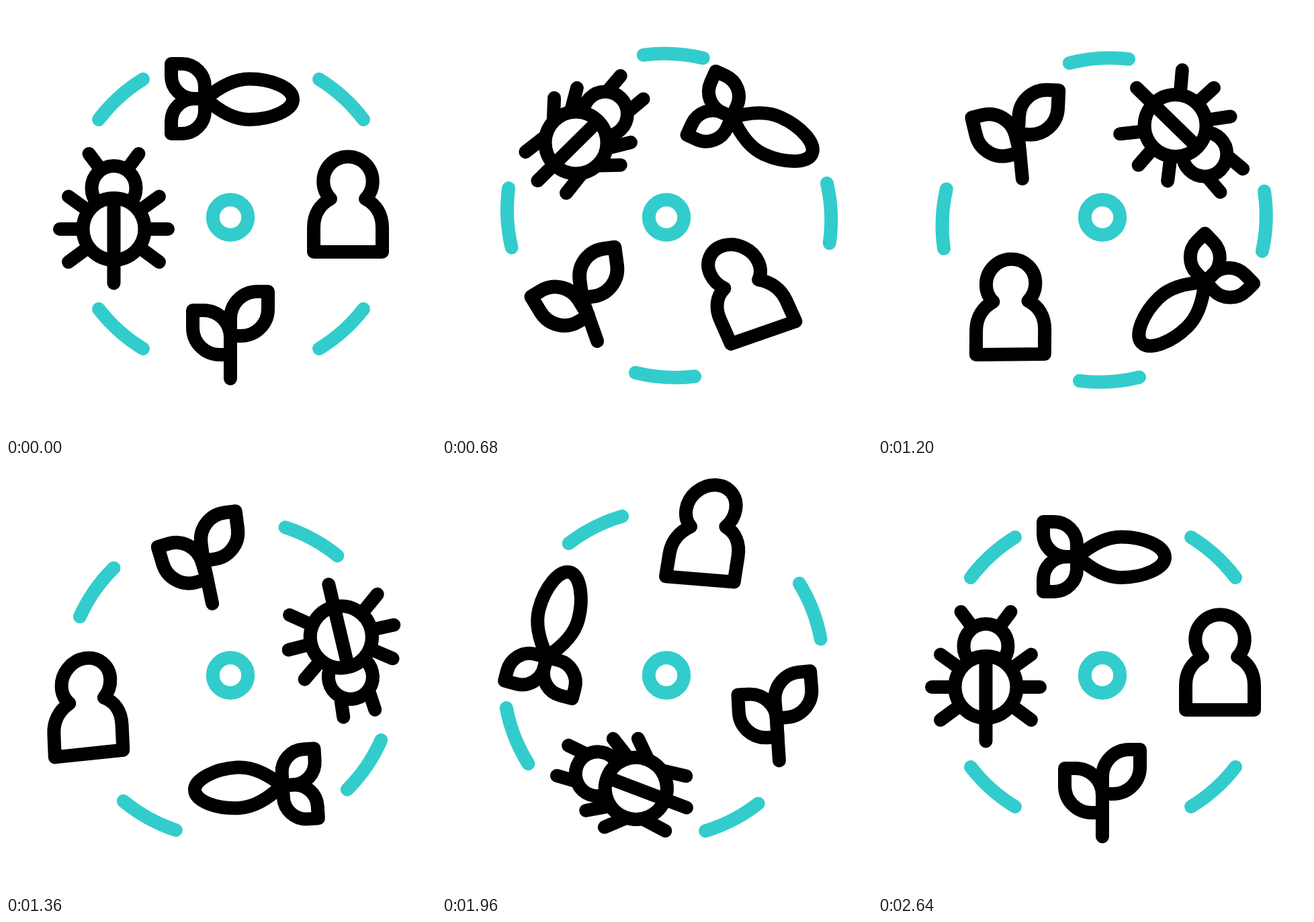
These frames come from a looping animation (640 px wide and 640 px high, 3000 ms). An HTML page with a canvas:

```html
<!DOCTYPE html>
<html>
<head>
<meta charset="utf-8">
<style>
  html, body { margin: 0; width: 100%; height: 100%; overflow: hidden; background: #fff; }
  canvas { display: block; width: 640px; height: 640px; }
</style>
</head>
<body>
<canvas width="640" height="640"></canvas>
<script>
const ctx = document.querySelector('canvas').getContext('2d');
const LOOP = 3000, STEP = 40, START = 80, END = 2520;
const CX = 334, CY = 314.5;
const TEAL = '#33cccc', BLACK = '#000';

const rad = deg => deg * Math.PI / 180;
const smooth = u => u * u * (3 - 2 * u);

// Cubic-bezier easing with flat ends, solved by bisection.
function bezier(x1, x2, x) {
  let low = 0, high = 1;
  for (let i = 0; i < 24; i++) {
    const u = (low + high) / 2, v = 1 - u;
    if (3 * x1 * u * v * v + 3 * x2 * u * u * v + u * u * u < x) low = u;
    else high = u;
  }
  return smooth(low);
}

// Eases from rest through [moment, value] poses and back to rest.
function sway(p, ...poses) {
  const keys = [[0, 0], ...poses, [1, 0]];
  const next = Math.max(1, keys.findIndex(([at]) => at >= p));
  const [from, a] = keys[next - 1], [to, b] = keys[next];
  return a + (b - a) * smooth((p - from) / (to - from));
}

// One smooth rise and fall between two moments.
const bump = (p, from, to) => p > from && p < to ? Math.sin(Math.PI * (p - from) / (to - from)) ** 2 : 0;

function spin(deg, x, y, draw, scale = 1) {
  ctx.save();
  ctx.translate(x, y);
  ctx.rotate(rad(deg));
  ctx.scale(scale, scale);
  ctx.translate(-x, -y);
  draw();
  ctx.restore();
}

function line(d, color = BLACK, fill) {
  const path = new Path2D(d);
  if (fill) {
    ctx.fillStyle = fill;
    ctx.fill(path);
  }
  ctx.strokeStyle = color;
  ctx.stroke(path);
}

const ring = (x, y, r) => `M${x - r} ${y}a${r} ${r} 0 1 1 ${2 * r} 0a${r} ${r} 0 1 1 ${-2 * r} 0Z`;

function drawArcs() {
  line('M138 169A242 242 0 0 1 204 109M466 109A242 242 0 0 1 532 169', TEAL);
  line('M138 451A242 242 0 0 0 204 510M466 510A242 242 0 0 0 532 451', TEAL);
}

function drawFish() {
  line('M297 138C317 121 340 108.5 362 108.5C395 108.5 427 122 427 139C427 155 395 169 362 169C340 169 317 156 297 138Z');
  line('M246 86H262A34 34 0 0 1 296 120V138H280A34 34 0 0 1 246 104Z');
  line('M246 190H262A34 34 0 0 0 296 156V138H280A34 34 0 0 0 246 172Z');
}

function drawBug(kick, feelers) {
  const x = 160.5, y = 332;
  for (const side of [-1, 1]) {
    const limb = (x1, y1, x2, y2, turn) => spin(-side * turn, x + side * x1, y + y1,
      () => line(`M${x + side * x1} ${y + y1}L${x + side * x2} ${y + y2}`));
    limb(39, -28, 67.5, -48.5, kick / 2);
    limb(48, 0, 80.5, 0, kick);
    limb(39, 28, 67.5, 49, -kick);
    limb(22, -92, 37, -112, feelers);
  }
  line(ring(x, 271, 33));
  line(ring(x, y, 46), BLACK, '#fff');
  line(`M${x} 287V412.5`);
}

function drawPlant(spread) {
  const scale = 1 + spread * 0.003;
  line('M334 491V554.5');
  ctx.translate(0, -spread * 0.4);
  spin(-spread, 334, 519, () => line('M278 453H294A40 40 0 0 1 334 493V519H318A40 40 0 0 1 278 479Z'), scale);
  spin(spread, 334, 491, () => line('M390 425H374A40 40 0 0 0 334 465V491H350A40 40 0 0 0 390 451Z'), scale);
}

const personPath = 'M-51 51.5L-51 15C-51 -4 -42 -19 -26 -27.5C-40.3 -41.8 -40.3 -65.2 -26 -79.5'
  + 'C-11.7 -93.8 11.7 -93.8 26 -79.5C40.3 -65.2 40.3 -41.8 26 -27.5C42 -19 51 -4 51 15L51 51.5Z';

// The figure leans from its flat base; the shoulders and head tilt with it.
function drawPerson(lean) {
  const k = Math.tan(rad(lean));
  line(personPath.replace(/(-?[\d.]+) (-?[\d.]+)/g, (_, x, y) => {
    const height = Math.min(1, (51.5 - y) / 79);
    return `${(x - y * k).toFixed(2)} ${(y - x * height * k).toFixed(2)}`;
  }));
}

function render(t) {
  const p = Math.min(1, Math.max(0, (t - START) / (END - START)));
  const wheel = 360 * bezier(0.3625, 0.773, p);

  ctx.fillStyle = '#fff';
  ctx.fillRect(0, 0, 640, 640);
  ctx.lineWidth = 20;
  ctx.lineCap = ctx.lineJoin = 'round';

  line(ring(CX, CY, 26.2), TEAL);
  spin(wheel, CX, CY, () => {
    drawArcs();
    drawBug(47 * Math.sin(2 * Math.PI * p) ** 2, sway(p, [0.2, 32], [0.8, 32]));
    spin(sway(p, [0.25, -21], [0.6, 14], [0.82, -9]), 302, 138, drawFish);

    // Plant and person stay upright while they travel round.
    const plantTilt = sway(p, [0.23, -20], [0.38, -1], [0.6, -16], [0.82, -2]);
    spin(plantTilt - wheel, CX, 489.5, () => drawPlant(sway(p, [0.3, 13], [0.7, -1])));

    const personTilt = sway(p, [0.23, -20], [0.38, 6], [0.53, -6], [0.8, 5]);
    ctx.translate(CX + 175 + 57 * bump(p, 0.3, 0.92), CY - 20 * bump(p, 0.3, 1));
    ctx.rotate(rad(personTilt - wheel));
    drawPerson(sway(p, [0.25, -5], [0.65, 6]));
  });
}

function tick(now) {
  render(Math.floor(now % LOOP / STEP) * STEP);
  requestAnimationFrame(tick);
}
tick(performance.now());
</script>
</body>
</html>
```
